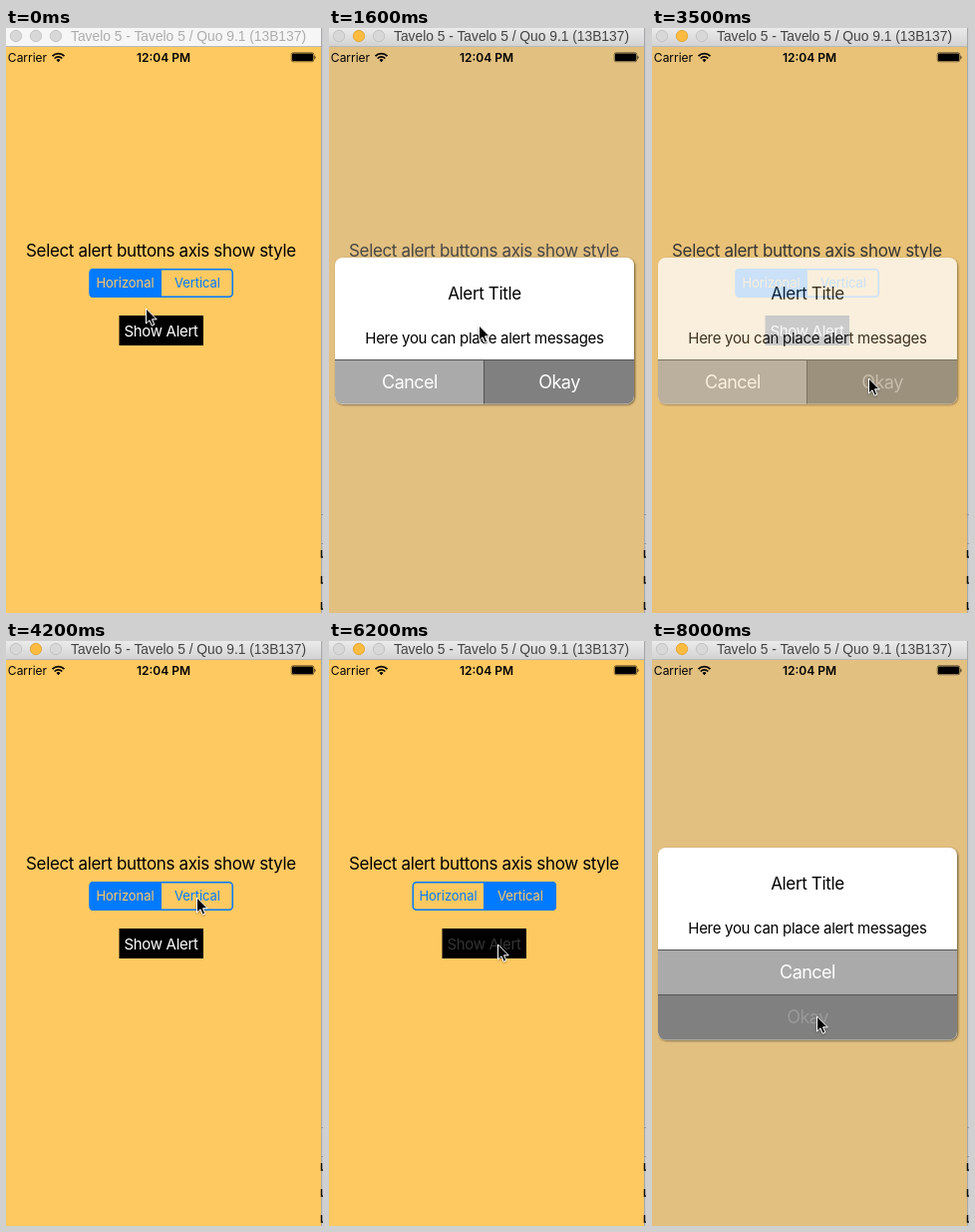
Animation of 318x586 px, one loop 8.1 s. Source, as an HTML page:

```html
<!DOCTYPE html>
<html lang="en">
<head>
<meta charset="utf-8">
<title>Alert button axis demo</title>
<style>
  html, body { margin: 0; width: 100%; height: 100%; overflow: hidden; background: #fff; }
  svg { display: block; width: 318px; height: 586px; }
  text { font-family: Inter, Roboto, sans-serif; text-anchor: middle; }
  .large { font-size: 17px; letter-spacing: -.021em; }
  .body { font-size: 15px; letter-spacing: -.02em; }
  .segment { font-size: 13px; letter-spacing: -.005em; }
  .action { font-size: 18px; letter-spacing: -.03em; fill: #fff; }
  .status { font-size: 12px; }
  #windowTitle { font: 13.8px "Liberation Sans", Arial, sans-serif; }
</style>
</head>
<body>
<svg viewBox="0 0 318 586">
  <defs>
    <linearGradient id="chrome" x2="0" y2="1">
      <stop stop-color="#ebebeb"/><stop offset="1" stop-color="#d3d3d3"/>
    </linearGradient>
    <filter id="shadow" x="-5%" y="-5%" width="110%" height="112%">
      <feDropShadow dx="1" dy="1" stdDeviation="1" flood-opacity=".55"/>
    </filter>
    <filter id="cursorShadow" x="-30%" y="-20%" width="170%" height="150%">
      <feDropShadow dx="0" dy="1" stdDeviation=".8" flood-opacity=".35"/>
    </filter>
    <clipPath id="segmentClip"><rect x="83.5" y="241" width="144.5" height="29" rx="4"/></clipPath>
  </defs>

  <!-- Screen -->
  <rect width="316" height="586" fill="#ffc961"/>
  <text class="large" x="155.5" y="229">Select alert buttons axis show style</text>
  <g clip-path="url(#segmentClip)">
    <rect id="leftFill" x="83" y="241" width="73" height="29" fill="#007aff"/>
    <rect id="rightFill" x="155" y="241" width="73" height="29" fill="#007aff"/>
  </g>
  <path d="M155.5 241v29" stroke="#007aff"/>
  <rect x="84.25" y="241.75" width="143" height="27.5" rx="3.5" fill="none" stroke="#007aff" stroke-width="1.5"/>
  <text class="segment" id="leftLabel" x="119.5" y="260">Horizonal</text>
  <text class="segment" id="rightLabel" x="192" y="260">Vertical</text>
  <rect x="113.5" y="288" width="84.5" height="30"/>
  <text class="body" id="showLabel" x="155.5" y="308.5" fill="#fff">Show Alert</text>

  <!-- Alerts -->
  <rect id="dim" y="18" width="316" height="568" fill="#b6b1b0"/>
  <g id="alertH">
    <rect x="6" y="230" width="300" height="146.5" rx="8" fill="#fff" filter="url(#shadow)"/>
    <text class="large" x="156" y="272">Alert Title</text>
    <text class="body" x="156" y="315.5">Here you can place alert messages</text>
    <path d="M6 332h149.5v44.5H14a8 8 0 0 1-8-8z" fill="#aaa"/>
    <path d="M155.5 332H306v36.5a8 8 0 0 1-8 8H155.5z" fill="#808080"/>
    <path d="M6 332.5h300M155.5 332v44.5" stroke="#555"/>
    <text class="action" x="81" y="361">Cancel</text>
    <text class="action" id="okayH" x="231" y="361">Okay</text>
  </g>
  <g id="alertV">
    <rect x="6" y="207" width="300" height="192.5" rx="8" fill="#fff" filter="url(#shadow)"/>
    <text class="large" x="156" y="249">Alert Title</text>
    <text class="body" x="156" y="293">Here you can place alert messages</text>
    <rect x="6" y="309" width="300" height="45" fill="#aaa"/>
    <path d="M6 354h300v37.5a8 8 0 0 1-8 8H14a8 8 0 0 1-8-8z" fill="#808080"/>
    <path d="M6 309.5h300M6 354.5h300" stroke="#555"/>
    <text class="action" x="156" y="338">Cancel</text>
    <text class="action" id="okayV" x="156" y="383">Okay</text>
  </g>

  <!-- Status bar -->
  <text class="status" x="21.5" y="33.5">Carrier</text>
  <path d="M46.5 28.2a8.2 8.2 0 0 1 12 0M48.7 30.5a5.2 5.2 0 0 1 7.6 0" fill="none" stroke="#000" stroke-width="1.7"/>
  <path d="M50.5 32a3 3 0 0 1 4 0l-2 2.3z"/>
  <text class="status" x="158" y="33.5" font-weight="600">12:04 PM</text>
  <rect x="286.25" y="24.75" width="22.5" height="9" rx="1.8" fill="none" stroke="#000" stroke-width=".5"/>
  <rect x="287" y="25.5" width="21" height="7.5" rx="1"/>
  <path d="M309.5 27.5q2 2 0 4z"/>

  <!-- Window frame and the desktop at its right edge -->
  <rect id="titleBar" width="316" height="18"/>
  <path d="M0 18.5h316" stroke="#b8b8b8"/>
  <rect x="316" width="1" height="586" fill="#a8a8a8"/>
  <rect x="317" width="1" height="586" fill="#cacace"/>
  <path d="M316 487.5h2M316 516.5h2" stroke="#8c94a0"/>
  <path d="M316.5 523v7h2M316.5 549v7h2M316.5 575v7h2" fill="none" stroke="#111" stroke-width="1.5"/>
  <g fill="#d8d8d8" stroke="#bdbdbd" stroke-width=".8">
    <circle cx="10" cy="8" r="5.7"/>
    <circle id="minimize" cx="30" cy="8" r="5.7"/>
    <circle cx="50" cy="8" r="5.7"/>
  </g>
  <text id="windowTitle" x="183" y="13">Tavelo 5 - Tavelo 5 / Quo 9.1 (13B137)</text>

  <path id="cursor" d="M.5 0v15l3.5-3.2 2.3 5.4 2.5-1.1-2.3-5.3h4.700z"
        stroke="#fff" stroke-linejoin="round" filter="url(#cursorShadow)"/>
</svg>
<script>
const LOOP = 8100, STEP = 100, FADE = 300;
const el = id => document.getElementById(id);
const set = (id, attrs) => {
  for (const name in attrs) el(id).setAttribute(name, attrs[name]);
};
const progress = (t, start, length = FADE) => Math.min(1, Math.max(0, (t - start) / length));
const ease = p => p * p * (3 - 2 * p);

// Pointer stops: time, x, y
const stops = [
  [0, 140, 281], [400, 147, 293], [600, 147, 293], [800, 150, 298],
  [1700, 150, 298], [2500, 200, 340], [3100, 217, 351], [3600, 217, 351],
  [4200, 191, 257], [5300, 191, 257], [6000, 169, 304],
  [6900, 169, 304], [7600, 165, 376], [LOOP, 165, 376]
];

function pointerAt(t) {
  const i = stops.findIndex(stop => stop[0] > t);
  const [t0, x0, y0] = stops[i - 1], [t1, x1, y1] = stops[i];
  const p = ease(progress(t, t0, t1 - t0));
  return [x0 + (x1 - x0) * p, y0 + (y1 - y0) * p];
}

// Label opacity of a button: drops on touch, fades back on release
const pressed = (t, down, up) => t < down ? 1 : .2 + .8 * progress(t, up);

function draw(t) {
  const active = t >= 1000;
  set('titleBar', { fill: active ? 'url(#chrome)' : '#f6f6f6' });
  set('windowTitle', { fill: active ? '#444' : '#adadad' });
  set('minimize', { fill: active ? '#fdbc40' : '#d8d8d8', stroke: active ? '#e0a030' : '#bdbdbd' });

  const vertical = t >= 4600;
  set('leftFill', { 'fill-opacity': vertical ? 0 : 1 });
  set('rightFill', { 'fill-opacity': vertical ? 1 : t >= 4400 ? .15 : 0 });
  set('leftLabel', { fill: vertical ? '#007aff' : '#ffc961' });
  set('rightLabel', { fill: vertical ? '#ffc961' : '#007aff' });

  set('showLabel', { opacity: t < 4000 ? pressed(t, 1100, 1280) : pressed(t, 6200, 6300) });
  set('okayH', { opacity: pressed(t, 3200, 3400) });
  set('okayV', { opacity: pressed(t, 7900, LOOP) });

  const horizontalAlpha = ease(progress(t, 1280)) - ease(progress(t, 3400));
  const verticalAlpha = ease(progress(t, 6300));
  set('alertH', { opacity: horizontalAlpha });
  set('alertV', { opacity: verticalAlpha });
  set('dim', { opacity: .4 * (horizontalAlpha + verticalAlpha) });

  set('cursor', { transform: `translate(${pointerAt(t).map(Math.round)})` });
}

const began = performance.now();
function tick() {
  const t = (performance.now() - began) % LOOP;
  draw(Math.floor(t / STEP) * STEP);
  requestAnimationFrame(tick);
}
tick();
</script>
</body>
</html>
```
